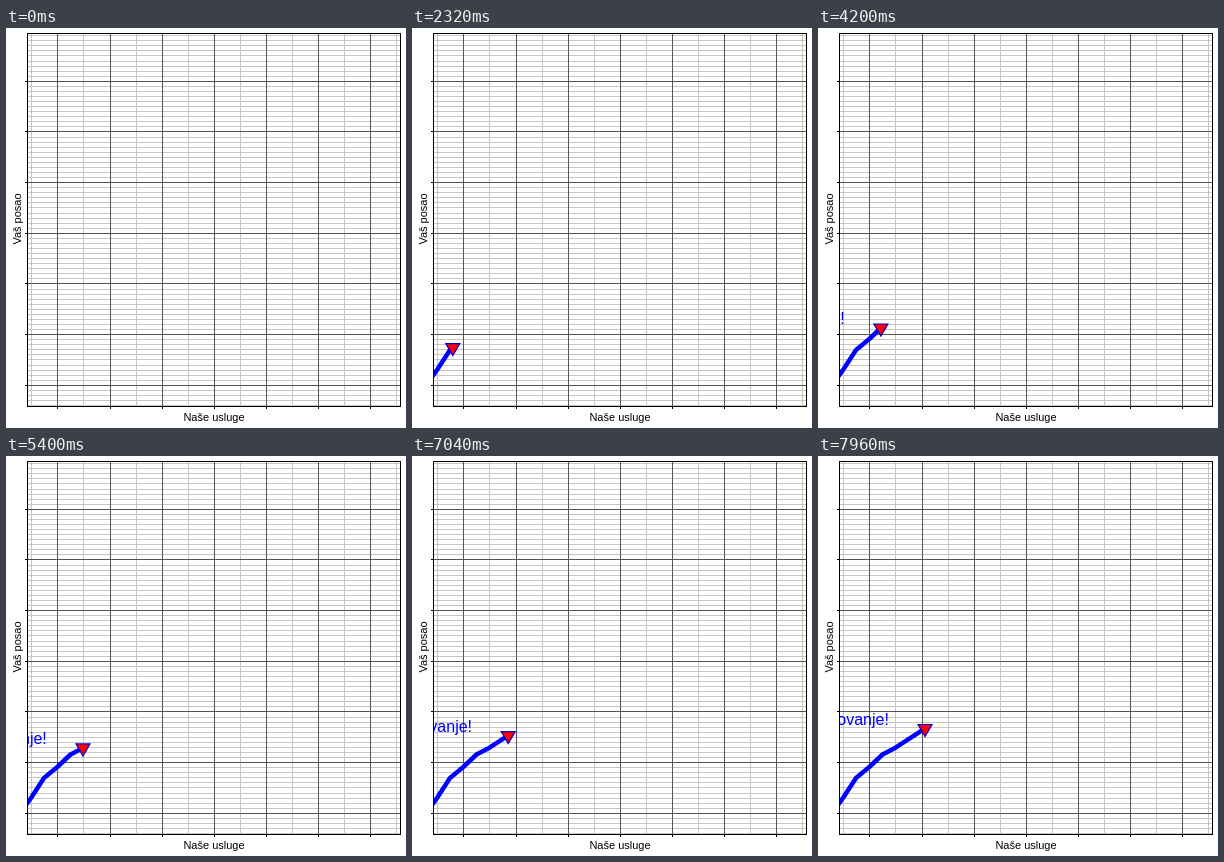
These frames come from a looping animation (400x400 px, 8 s). An HTML page:

```html
<!DOCTYPE html>
<html lang="hr">
<head>
<meta charset="utf-8">
<title>Vaš posao</title>
<style>
html, body { margin: 0; width: 100%; height: 100%; overflow: hidden; background: #fff; }
svg { display: block; width: 400px; height: 400px; }
text { font-family: "Liberation Sans", Arial, sans-serif; }
.axis { font-size: 11px; text-anchor: middle; }
.note { font-size: 16px; text-anchor: end; fill: #00f; }
#grid { shape-rendering: crispEdges; fill: none; stroke-width: 1; }
#line { fill: none; stroke: #00f; stroke-width: 4.5; stroke-linejoin: round; stroke-linecap: round; }
#mark { fill: #f00; stroke: #0000d0; stroke-width: 1.2; }
</style>
</head>
<body>
<svg viewBox="0 0 400 400">
  <defs><clipPath id="plot"><rect x="22" y="6" width="372" height="372"/></clipPath></defs>
  <g id="grid">
    <path id="minor" stroke="#c6c6c6"/>
    <path id="major" stroke="#555"/>
    <path id="ticks" stroke="#000"/>
    <rect x="21.5" y="5.5" width="373" height="373" stroke="#000"/>
  </g>
  <g clip-path="url(#plot)">
    <polyline id="line"/>
    <g id="tip">
      <path id="mark" d="M-7-4H7L0 8Z"/>
      <text class="note" x="-36.2" y="-3.7">ovanje!</text>
    </g>
  </g>
  <text class="axis" x="208" y="393">Naše usluge</text>
  <text class="axis" transform="translate(15 191) rotate(-90)">Vaš posao</text>
</svg>
<script>
const LOOP = 8000, STEP = 40, HOLD = 160;
const START_X = 13.6, SPEED = 0.01174;
const knots = [[12, 360], [25, 342], [38, 322], [51.3, 311], [64.5, 298.5],
               [77.5, 291.7], [90.6, 283.2], [103.7, 274.7], [116.7, 266.2]];
const el = id => document.getElementById(id);

function drawGrid() {
  const v = x => `M${Math.round(x) + 0.5} 6V378`;
  const h = y => `M22 ${Math.round(y) + 0.5}H394`;
  let minor = '', major = '', ticks = '';
  for (let i = 0; i < 8; i++) minor += v(25.3 + i * 52.15);
  for (let y = 7.2; y < 378; y += 5.067) minor += h(y);
  for (let i = 0; i < 7; i++) {
    const x = 51.4 + i * 52.15, y = 52.8 + i * 50.67;
    major += v(x) + h(y);
    ticks += `M${Math.round(x) + 0.5} 379v2M19 ${Math.round(y) + 0.5}h2`;
  }
  el('minor').setAttribute('d', minor);
  el('major').setAttribute('d', major);
  el('ticks').setAttribute('d', ticks);
}

function heightAt(x) {
  const i = knots.findIndex(k => k[0] >= x);
  const [x0, y0] = knots[i - 1], [x1, y1] = knots[i];
  return y0 + (y1 - y0) * (x - x0) / (x1 - x0);
}

function draw(now) {
  let t = Math.floor((now % LOOP) / STEP) * STEP;
  if (t < HOLD) t = 0;
  const x = START_X + t * SPEED, y = heightAt(x);
  const path = knots.filter(k => k[0] < x).concat([[x, y]]);
  el('line').setAttribute('points', path.join(' '));
  el('tip').setAttribute('transform', `translate(${x} ${y})`);
}

let start;
function tick(now) {
  start ??= now;
  draw(now - start);
  requestAnimationFrame(tick);
}

drawGrid();
draw(0);
requestAnimationFrame(tick);
</script>
</body>
</html>
```
